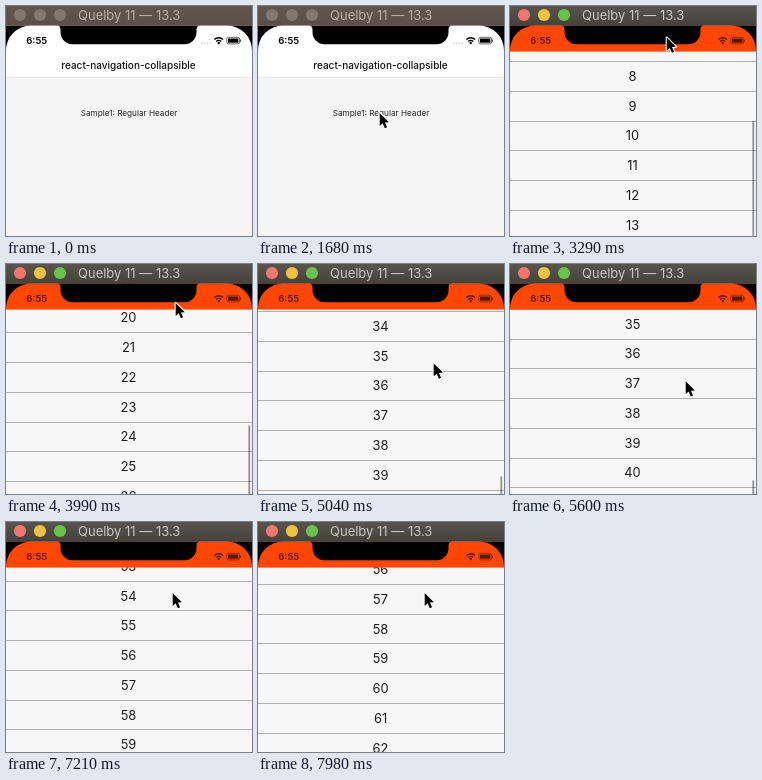
Animation, 246 px wide and 230 px high, one loop 8 s. Source, as an HTML page with a canvas:

```html
<!DOCTYPE html>
<html lang="en">
<head>
<meta charset="utf-8">
<title>Collapsible header</title>
<style>
  html, body { margin: 0; width: 100%; height: 100%; overflow: hidden; }
  canvas { display: block; width: 246px; height: 230px; }
</style>
</head>
<body>
<canvas id="stage"></canvas>
<script>
const W = 246, H = 230, LOOP = 8000, STEP = 70;
const BAR = 19.5, STATUS_END = 45.6, HEADER = 26.1, LIST_TOP = 72, ROW = 29.75;
const TAP = 1820, PUSH = 2050;
const canvas = document.getElementById('stage');
const g = canvas.getContext('2d');
const scale = window.devicePixelRatio || 1;
canvas.width = W * scale;
canvas.height = H * scale;

// Each press drags the pointer and scrolls the list, which coasts until `span` is over
const gestures = [
  { at: TAP, press: 140, span: 140, scroll: 0, from: [121, 106], to: [121, 106] },
  { at: 2940, press: 210, span: 1120, scroll: 377, from: [150, 185], to: [156, 30] },
  { at: 3710, press: 210, span: 1120, scroll: 434.3, from: [166, 180], to: [169, 38] },
  { at: 4480, press: 210, span: 1120, scroll: 256.7, from: [172, 185], to: [175, 98] },
  { at: 5810, press: 350, span: 350, scroll: -50.6, from: [175, 140], to: [174, 179] },
  { at: 6650, press: 210, span: 1120, scroll: 688, from: [174, 179], to: [166, 70] }
];

const mix = (a, b, p) => a + (b - a) * p;
const clamp = v => Math.min(1, Math.max(0, v));
const easeOut = p => 1 - (1 - p) ** 3;

function scrollState(t) {
  let scroll = 0, collapse = 0;
  for (const { at, span, scroll: distance } of gestures) {
    const moved = distance * easeOut(clamp((t - at) / span));
    scroll += moved;
    collapse = clamp(collapse + moved / HEADER);
  }
  return { scroll, collapse };
}

function pointerAt(t) {
  if (t < TAP) {
    const u = clamp((t - 70) / 1610), r = (1 - u) ** 2;
    return [121 - 119 * r * Math.cos(9 * u), 106 - 99 * r * Math.cos(7 * u)];
  }
  const i = gestures.findLastIndex(k => t >= k.at);
  const { at, press, from, to } = gestures[i];
  const drag = clamp((t - at) / press);
  const next = gestures[i + 1] || { at: LOOP, from: to };
  const back = clamp((t - at - press) / (next.at - at - press)) ** 4;
  return from.map((v, k) => mix(mix(v, to[k], drag), next.from[k], back));
}

function rect(x, y, w, h, fill) {
  g.fillStyle = fill;
  g.fillRect(x, y, w, h);
}

function disc(x, y, r, fill) {
  g.fillStyle = fill;
  g.beginPath();
  g.arc(x, y, r, 0, 7);
  g.fill();
}

function text(str, x, y, size, fill, weight = 400, align = 'center') {
  g.font = `${weight} ${size}px Inter, sans-serif`;
  g.textAlign = align;
  g.fillStyle = fill;
  g.fillText(str, x, y);
}

function drawHome(push) {
  const x = -0.3 * W * push;
  rect(0, BAR, W, H, '#f5f5f5');
  text('Sample1: Regular Header', 123 + x, 110, 8.2, '#222');
  rect(0, BAR, W, 52, '#fff');
  rect(0, 71.5, W, 0.6, '#dcdcdc');
  g.globalAlpha = 1 - push;
  text('react-navigation-collapsible', 122.5 + x, 63, 10, '#111', 500);
  g.globalAlpha = 1;
}

function drawList(t, push) {
  const { scroll, collapse } = scrollState(t);
  g.save();
  g.translate(W * (1 - push), 0);
  rect(0, BAR, W, H, '#f7f7f7');
  const first = Math.max(0, Math.floor((scroll - LIST_TOP) / ROW));
  for (let i = first; i < first + 12; i++) {
    const y = LIST_TOP + i * ROW - scroll;
    text(i, 122.5, y + 19.4, 12.9, '#1c1c1c');
    rect(0, Math.floor(y + ROW), W, 1, '#b0b0b0');
  }
  if (scroll > 0) rect(242.4, 83 + scroll / 8, 1.8, H, 'rgba(0,0,0,.42)');

  const color = [mix(46, 255, collapse), mix(146, 70, collapse), mix(8, 2, collapse)];
  rect(0, BAR, W, STATUS_END - BAR + HEADER * (1 - collapse), `rgb(${color})`);
  g.translate(0, -HEADER * collapse);
  g.globalAlpha = push * (1 - collapse);
  text('Regular Header', 122.7, 62.8, 9.8, '#fff', 600);
  text('Back', 16, 62.8, 10, '#fff', 400, 'left');
  g.strokeStyle = '#fff';
  g.lineWidth = 1.6;
  g.beginPath();
  g.moveTo(11.5, 53.5);
  g.lineTo(6, 59);
  g.lineTo(11.5, 64.5);
  g.stroke();
  g.restore();
}

function drawStatus(push) {
  g.globalAlpha = mix(1, 0.65, push);
  text('6:55', 30.7, 38.2, 9.6, '#000', 600);
  for (let i = 0; i < 4; i++) disc(196 + i * 2.7, 37, 0.6, 'rgba(0,0,0,.4)');
  g.strokeStyle = '#000';
  g.lineWidth = 1.4;
  for (const r of [3.6, 6.2]) {
    g.beginPath();
    g.arc(212.7, 38, r, -2.35, -0.79);
    g.stroke();
  }
  disc(212.7, 37, 1.2, '#000');
  g.lineWidth = 0.6;
  g.beginPath();
  g.roundRect(220.8, 31.3, 12.8, 6.6, 1.8);
  g.stroke();
  rect(222, 32.5, 10.4, 4.2, '#000');
  rect(234.3, 33.6, 0.8, 2.2, '#000');
  g.globalAlpha = 1;
}

function drawBezel() {
  const left = 54.5, right = 190.5, bottom = 38.3;
  g.fillStyle = '#000';
  g.beginPath();
  g.rect(0, BAR, W, H);
  g.roundRect(0, BAR, W, 400, 25);
  g.fill('evenodd');
  g.beginPath();
  g.moveTo(left - 4, BAR);
  g.arcTo(left, BAR, left, bottom, 4);
  g.arcTo(left, bottom, right, bottom, 12);
  g.arcTo(right, bottom, right, BAR, 12);
  g.arcTo(right, BAR, right + 4, BAR, 4);
  g.fill();
}

function drawTitleBar(active) {
  const shade = g.createLinearGradient(0, 0, 0, BAR);
  shade.addColorStop(0, active ? '#59554e' : '#62554c');
  shade.addColorStop(1, active ? '#45413b' : '#5b4f47');
  rect(0, 0, W, BAR, shade);
  ['#f0776c', '#eec340', '#69c34b'].forEach((fill, i) =>
    disc(14 + i * 20, 9, 6.1, active ? fill : '#83776e'));
  text('Quelby 11 — 13.3', 72, 14, 13, active ? '#c9c6c3' : '#b9afa8', 400, 'left');
}

function drawPointer(t) {
  if (t < 70) return;
  g.save();
  g.translate(...pointerAt(t));
  if (gestures.some(({ at, press }) => t >= at && t < at + press)) {
    g.strokeStyle = 'rgba(90,90,90,.55)';
    g.lineWidth = 1.2;
    g.beginPath();
    g.arc(0, 0, 22, 0, 7);
    g.stroke();
  }
  g.translate(0.7, 1);
  g.scale(0.92, 0.92);
  g.beginPath();
  [[0, 0], [0, 14], [3.2, 11.2], [5.6, 16.6], [8, 15.5], [5.7, 10.3], [10, 10]]
    .forEach(p => g.lineTo(...p));
  g.closePath();
  g.strokeStyle = '#fff';
  g.lineWidth = 2.4;
  g.lineJoin = 'round';
  g.stroke();
  g.fillStyle = '#000';
  g.fill();
  g.restore();
}

function draw(t) {
  const push = easeOut(clamp((t - PUSH) / 750));
  g.setTransform(scale, 0, 0, scale, 0, 0);
  if (push < 1) drawHome(push);
  if (push > 0) drawList(t, push);
  drawStatus(push);
  drawBezel();
  drawTitleBar(t >= TAP);
  drawPointer(t);
}

function tick() {
  const t = performance.now() % LOOP;
  draw(Math.floor(t / STEP) * STEP);
  requestAnimationFrame(tick);
}
tick();
</script>
</body>
</html>
```
